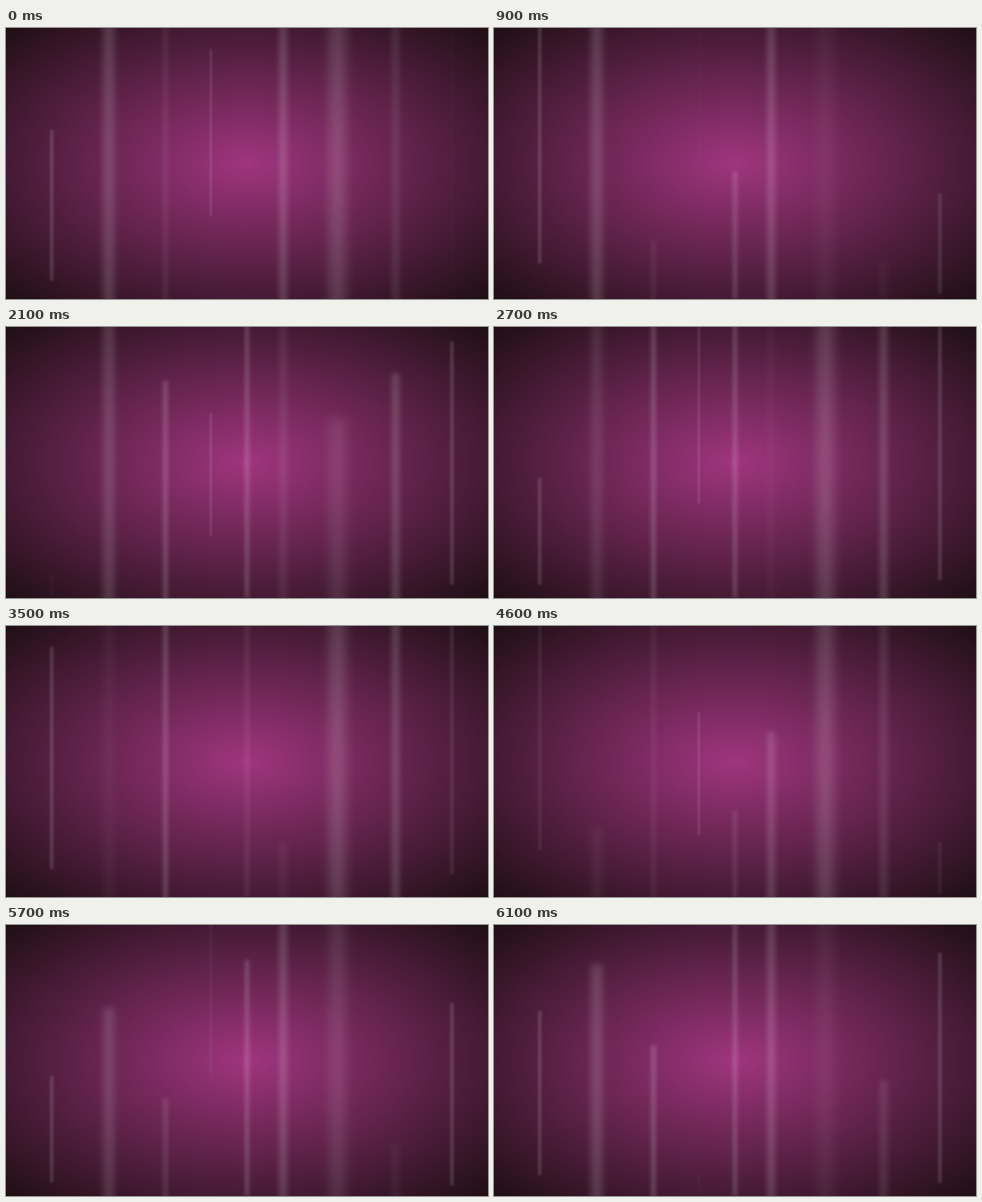
An HTML page for the animation above (6200 ms loop, 600x338 px).

```html
<!DOCTYPE html>
<html lang="en">
<head>
<meta charset="utf-8">
<title>Rising light bars</title>
<style>
  html, body {
    margin: 0;
    width: 100%;
    height: 100%;
    overflow: hidden;
  }
  #stage {
    position: relative;
    width: 600px;
    height: 338px;
    overflow: hidden;
    background: radial-gradient(ellipse farthest-corner at center, #9f357e, #1f0f15);
  }
  /* --x: centre, --size: drives thickness, softness and growth, --period: seconds per rise */
  #stage i {
    position: absolute;
    left: calc(var(--x) * 1px);
    width: calc(var(--size) * .7px);
    margin-left: calc(var(--size) * -.35px);
    background: #fff;
    filter: blur(calc(var(--size) * .2px + .3px));
  }
</style>
</head>
<body>
<div id="stage">
  <i style="--x: 57; --size: 6; --period: 3"></i>
  <i style="--x: 128; --size: 20; --period: 8"></i>
  <i style="--x: 198; --size: 10; --period: 4.5"></i>
  <i style="--x: 255; --size: 3; --period: 2.5"></i>
  <i style="--x: 300; --size: 8; --period: 4"></i>
  <i style="--x: 345; --size: 14; --period: 7"></i>
  <i style="--x: 412; --size: 30; --period: 5.3"></i>
  <i style="--x: 485; --size: 15; --period: 4.7"></i>
  <i style="--x: 555; --size: 7; --period: 4.1"></i>
</div>
<script>
  const HEIGHT = 338;
  const LOOP = 6.2;
  const FPS = 10;
  const LEAD = 4.04; // all bars set off together this long before the loop begins
  const PEAK = 0.155;

  const bars = [...document.querySelectorAll('#stage i')].map(({ style }) => ({
    style,
    scale: 0.4 + 0.2 * style.getPropertyValue('--size'),
    period: +style.getPropertyValue('--period')
  }));

  // Fade in over the first quarter, out over the last.
  const fade = p => Math.min(1, p * 4, (1 - p) * 4);

  // Each bar's centre climbs one stage height while its length grows from zero.
  function draw(time) {
    for (const { style, scale, period } of bars) {
      const p = ((time + LEAD) / period) % 1;
      const length = HEIGHT * scale * p;
      style.top = HEIGHT * (1 - p) - length / 2 + 'px';
      style.height = length + 'px';
      style.opacity = PEAK * fade(p);
    }
  }

  const start = performance.now();

  function tick() {
    const time = (performance.now() - start) / 1000 % LOOP;
    draw(Math.floor(time * FPS) / FPS);
    requestAnimationFrame(tick);
  }

  tick();
</script>
</body>
</html>
```
